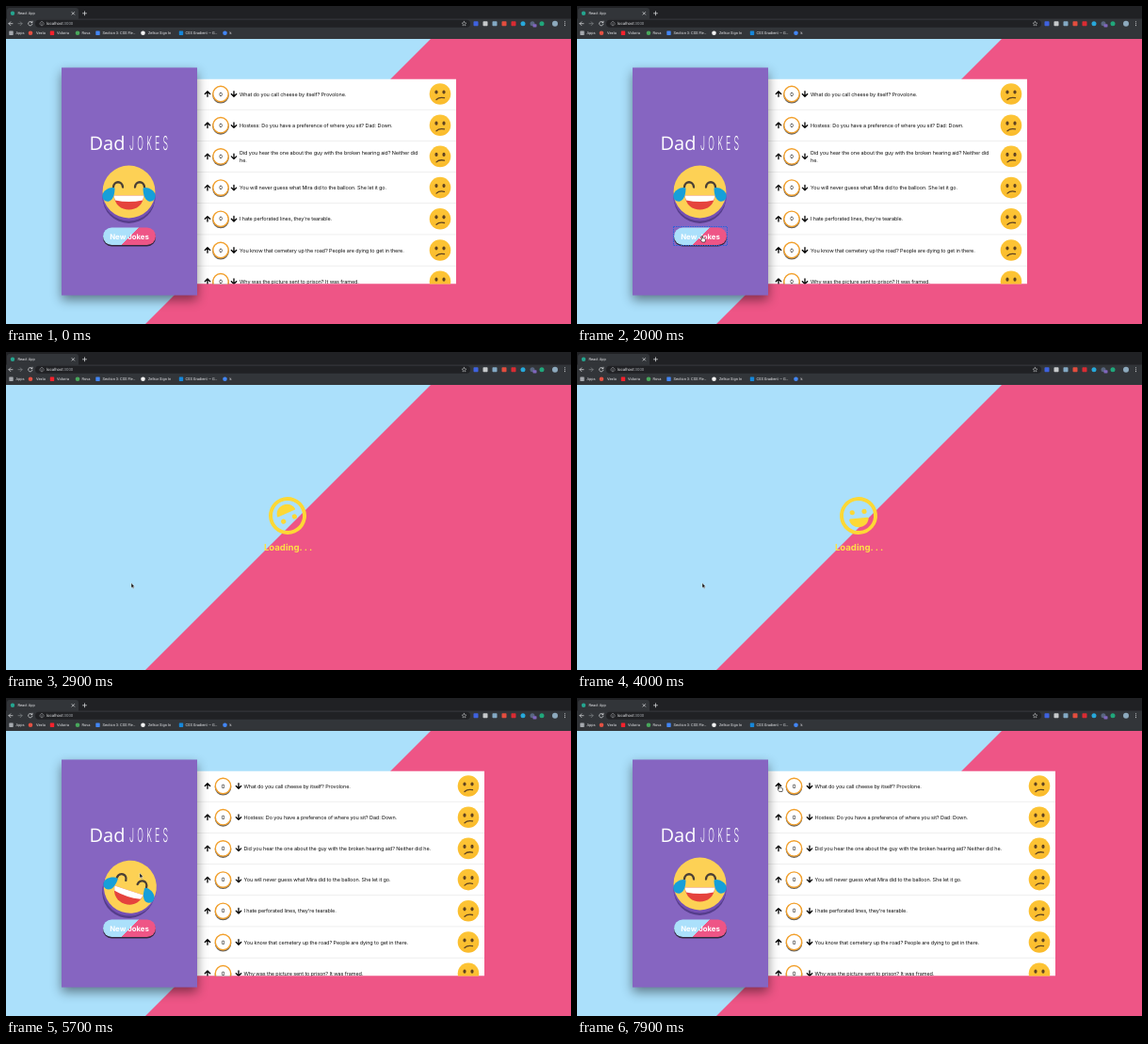
These frames come from a looping animation (600 by 338 pixels, 8 s). An HTML page:

```html
<!DOCTYPE html>
<html lang="en">
<head>
<meta charset="utf-8">
<title>Dad Jokes</title>
<style>
html, body { margin: 0; width: 100%; height: 100%; overflow: hidden; background: #abe0fb; }
svg { display: block; }
text { font-family: Inter, "Open Sans", sans-serif; text-rendering: geometricPrecision; white-space: pre; }
.chrome text { font-family: Roboto, Inter, sans-serif; font-size: 4px; fill: #e4e5e8; }
.joke { font-size: 5.5px; letter-spacing: -.1px; fill: #111; }
.line { fill: none; stroke-linecap: round; stroke-linejoin: round; }
#card { filter: drop-shadow(0 5px 6px rgba(0, 0, 0, .45)); }
</style>
</head>
<body>
<svg id="stage" width="100%" height="100%" viewBox="0 0 600 338">
  <defs>
    <linearGradient id="split" gradientUnits="userSpaceOnUse" x1="122" y1="236" x2="141" y2="254">
      <stop offset=".5" stop-color="#abe0fb"/><stop offset=".5" stop-color="#ee5586"/>
    </linearGradient>
    <linearGradient id="gold" x2="0" y2="1">
      <stop stop-color="#fdc536"/><stop offset="1" stop-color="#fabb2c"/>
    </linearGradient>
    <g id="arrow"><path class="line" d="M0 2.8V-2.6M-2.7 0L0-2.7L2.7 0" stroke="#000" stroke-width="1.3"/></g>
    <g id="unsure">
      <circle r="11.3" fill="url(#gold)"/>
      <ellipse cx="-4" cy="-2" rx="1.6" ry="2.1" fill="#604320"/>
      <ellipse cx="4" cy="-2" rx="1.6" ry="2.1" fill="#604320"/>
      <path class="line" d="M-4 6Q-1 3 4.5 4.2" stroke="#604320" stroke-width="1.3"/>
    </g>
    <path id="tear" d="M-15-4C-19-6-27-2-28 3C-29 8-25 11-21 10C-16 8-15 1-15-4Z" fill="#169fd9"/>
  </defs>

  <rect width="600" height="338" fill="#abe0fb"/>
  <path d="M451 35H600V338H148Z" fill="#ee5586"/>

  <g id="app">
    <g id="lists"></g>
    <rect id="card" x="59" y="65.5" width="144" height="242" fill="#8665c1"/>
    <text x="88.500" y="153" font-size="20" fill="#fff" style="font-family:'Open Sans',Lato,sans-serif">Dad</text>
    <text transform="translate(131 153) scale(.43 1)" font-size="20.500" font-weight="300" letter-spacing="7.500" fill="#fff">JOKES</text>
    <g id="laugh">
      <circle cy="5.500" r="28" fill="#4d3782" opacity=".85"/>
      <circle cy="2.500" r="28.500" fill="#7450b4"/>
      <circle r="28" fill="#fdd155"/>
      <path class="line" d="M-16.500-5C-16-12-7-12-6.500-5M6.500-5C7-12 16-12 16.500-5" stroke="#493f35" stroke-width="2.300"/>
      <path d="M-16 4H16C15 14 8 19 0 19S-15 14-16 4Z" fill="#e5433d"/>
      <path d="M-16 4H16Q15.500 7 14.500 9Q0 12-14.500 9Q-15.500 7-16 4Z" fill="#fff"/>
      <use href="#tear"/><use href="#tear" transform="scale(-1 1)"/>
    </g>
    <rect x="103" y="237" width="56" height="18.500" rx="9.250" fill="#33283f"/>
    <rect x="103" y="235.500" width="56" height="18.500" rx="9.250" fill="url(#split)"/>
    <text x="131" y="247.600" font-size="7.800" font-weight="700" fill="#fff" text-anchor="middle">New Jokes</text>
    <rect id="focus" x="102.500" y="234.500" width="57" height="20" fill="none" stroke="#2962d9" stroke-dasharray="1.500 1"/>
  </g>

  <g id="loader">
    <g id="spinner" fill="#fdd835">
      <circle r="18" fill="none" stroke="#fdd835" stroke-width="3.900"/>
      <circle cx="-6.400" cy="-3.900" r="2.600"/><circle cx="6.400" cy="-3.900" r="2.600"/>
      <path d="M-9.300 2.600H9.300Q10.500 2.600 10.300 3.800C9.500 9 5.200 12.200 0 12.200S-9.500 9-10.300 3.800Q-10.500 2.600-9.300 2.600Z"/>
    </g>
    <text x="299.500" y="210.500" font-size="9.600" font-weight="700" fill="#fde047" text-anchor="middle">Loading. . .</text>
  </g>

  <g class="chrome" id="chrome"></g>

  <g id="cursor">
    <path id="pointer" d="M0 0V5.200L1.200 4.200L2 6L2.900 5.600L2.100 3.900H3.600Z" fill="#111" stroke="#fff" stroke-width=".4"/>
    <path id="hand" d="M-.6-1Q0-1.700.5-1V1.200L3 1.800Q3.600 2 3.500 3L3 5.500H-.2L-2 3Q-1.800 2-.6 2.800Z" fill="#fff" stroke="#111" stroke-width=".6"/>
  </g>
</svg>

<script>
const $ = id => document.getElementById(id);
const show = (id, on) => $(id).style.display = on ? "" : "none";
const dot = (x, y, r, fill) => `<circle cx="${x}" cy="${y}" r="${r}" fill="${fill}"/>`;
const box = (x, y, w, h, fill, r = 0) => `<rect x="${x}" y="${y}" width="${w}" height="${h}" rx="${r}" fill="${fill}"/>`;
const label = (x, y, s, extra = "") => `<text x="${x}" y="${y}" ${extra}>${s}</text>`;
const stroke = (d, color = "#e4e5e8", w = .7) => `<path class="line" d="${d}" stroke="${color}" stroke-width="${w}"/>`;

const jokes = [
  "What do you call cheese by itself? Provolone.",
  "Hostess: Do you have a preference of where you sit? Dad: Down.",
  "Did you hear the one about the guy with the broken hearing aid? Neither did he.",
  "You will never guess what Mira did to the balloon. She let it go.",
  "I hate perforated lines, they're tearable.",
  "You know that cemetery up the road? People are dying to get in there.",
  "Why was the picture sent to prison? It was framed."
];

// A joke panel; the narrow one wraps the longest joke.
function list(id, width, count, down, textX, face, wrap) {
  const rows = jokes.map((joke, i) => {
    const y = 16 + 33.2 * i;
    const lines = wrap && joke.length > 75 ? [joke.slice(0, -4), joke.slice(-3)] : [joke];
    const top = y + 2 - (lines.length - 1) * 3.6;
    return `<use href="#arrow" x="11" y="${y}"/>
      <circle cx="${count}" cy="${y + 1.2}" r="8.8" fill="#39332d" opacity=".75"/>
      <circle cx="${count}" cy="${y}" r="8.2" fill="#fff" stroke="#f2a02c" stroke-width="1.4"/>
      ${label(count, y + 2, "0", 'font-size="5.8" text-anchor="middle"')}
      <use href="#arrow" transform="translate(${down} ${y}) scale(1 -1)"/>
      ${lines.map((s, n) => label(textX, top + n * 7.2, s, 'class="joke"')).join("")}
      <use href="#unsure" x="${face}" y="${y}"/>
      ${box(0, y + 16.4, width, .5, "#dedede")}`;
  });
  return `<svg id="${id}" x="203" y="77.5" width="${width}" height="218">${box(0, 0, width, 218, "#fff")}${rows.join("")}</svg>`;
}
$("lists").innerHTML = list("narrow", 275, 25, 39, 45, 258, true) + list("wide", 305, 27.5, 44, 49.5, 288, false);

const bookmarks = [
  [5.5, "#a5a9ae", 10.5, "Apps"], [26, "#e35143", 32, "Vexto"], [49, "#f5222d", 54, "Vidorra"],
  [76, "#48a85b", 80.5, "Rova"], [97.5, "#4286f4", 102.5, "Section 3: CSS Fle…"],
  [145.5, "#f2f2f2", 151, "Zelkor Sign In"], [186, "#1687d9", 190.5, "CSS Gradient — G…"], [232.5, "#4286f4", 237.5, "k"]
];
const extensions = ["#3e62df", "#c6c9cb", "#83a9c4", "#e34d3e", "#d92b32", "#27a8da", "#596580", "#20a77b"];
$("chrome").innerHTML =
  box(0, 0, 600, 35, "#202124") + box(1, 2, 76, 14, "#323539", 3) + box(0, 13.5, 600, 21.5, "#323539") +
  box(31, 14.8, 462, 8, "#202124", 4) +
  dot(7, 7.7, 2.2, "#24a58f") + label(12.5, 9.2, "React App") +
  stroke("M70 6.5l2.600 2.600m0-2.600l-2.600 2.600M81.500 7.800h4m-2-2v4") +
  stroke("M7 18.700H3m1.800-1.900L3 18.700l1.800 1.900") +
  stroke("M13 18.700h4m-1.800-1.900L17 18.700l-1.800 1.900", "#85888c") +
  stroke("M27.500 17.200a2.200 2.200 0 1 0 .5 2M28 16.200v1.500h-1.500") +
  stroke("M38 16.600a2.100 2.100 0 1 0 .1 0M38 18.500v1.200", "#aeb1b5", .5) +
  label(43, 20.4, 'localhost<tspan fill="#999da2">:3000</tspan>', 'style="font-size:4.3px"') +
  stroke("M486.500 16.300l.7 1.600 1.700.2-1.300 1.200.4 1.700-1.500-.9-1.500.9.4-1.700-1.300-1.200 1.700-.2Z", "#c8cacc", .5) +
  extensions.map((c, i) => i > 4 ? dot(499 + i * 10, 18.7, 2.5, c) : box(496.5 + i * 10, 16.2, 5, 5, c, .7)).join("") +
  box(559.5, 19.2, 4, 3.2, "#8066be", .6) +
  dot(583, 18.7, 3, "#8da9bd") + [16.8, 18.7, 20.6].map(y => dot(593.5, y, .55, "#d4d6d8")).join("") +
  bookmarks.map(([x, color, tx, s], i) => (i % 2 ? dot(x, 28.7, 2.3, color) : box(x - 2.2, 26.5, 4.4, 4.4, color, .6)) + label(tx, 30.2, s)).join("");

const LOOP = 8000, LOAD = 2033, READY = 4250;
const route = [
  [700, 150, 345], [1700, 133, 245.5], [4300, 133, 245.5], [4950, 164.5, 211.5],
  [5250, 142, 186], [6800, 142, 186], [7700, 215, 94]
];

function cursorAt(t) {
  const i = route.findIndex(p => p[0] > t);
  if (i < 1) return i ? route.at(-1).slice(1) : route[0].slice(1);
  const [t0, x0, y0] = route[i - 1], [t1, x1, y1] = route[i];
  const u = (t - t0) / (t1 - t0), k = u * u * (3 - 2 * u);
  return [x0 + (x1 - x0) * k, y0 + (y1 - y0) * k];
}

function draw(now) {
  const t = now % LOOP;
  const loading = t >= LOAD && t < READY;
  show("app", !loading);
  show("loader", loading);
  show("narrow", t < LOAD);
  show("wide", t >= READY);
  show("focus", t > 1900 && t < LOAD);
  $("spinner").setAttribute("transform", `translate(299 174) rotate(${(t - LOAD) * .18})`);

  // The laughing face rocks while hovered.
  const sway = t > 5200 && t < 6800 ? Math.sin((t - 5200) / 1600 * 2 * Math.PI) : 0;
  const lift = Math.abs(sway);
  $("laugh").setAttribute("transform", `translate(${130.5 + 1.5 * lift} ${197.500 + 3.5 * lift}) rotate(${20 * sway})`);

  const hand = t > 1500 && t < LOAD || t > 7600;
  const [x, y] = cursorAt(t);
  show("cursor", t > 700);
  show("hand", hand);
  show("pointer", !hand);
  $("cursor").setAttribute("transform", `translate(${x} ${y})`);
  requestAnimationFrame(tick);
}
const start = performance.now();
const tick = () => draw(performance.now() - start);
tick();
</script>
</body>
</html>
```
